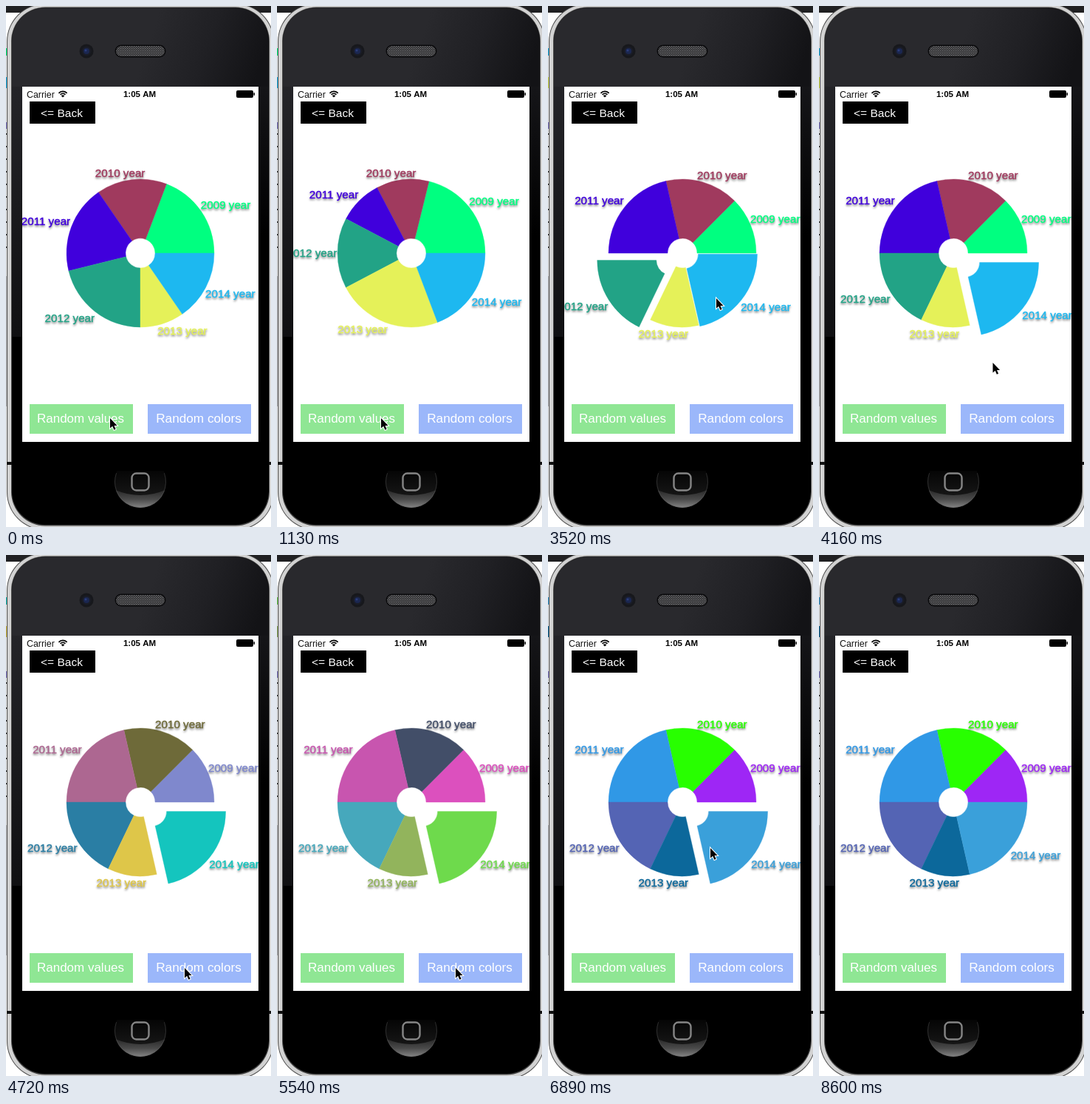
An HTML page with a canvas that plays this animation: 359 px wide and 704 px high, repeating every 8.84 s.

```html
<!DOCTYPE html>
<html lang="en">
<head>
<meta charset="utf-8">
<title>Pie chart demo</title>
<style>
html, body { margin: 0; width: 100%; height: 100%; overflow: hidden; background: #fff; }
canvas { display: block; width: 359px; height: 704px; }
</style>
</head>
<body>
<canvas id="stage"></canvas>
<script>
const W = 359, H = 704, LOOP = 8840, DUR = 520;
const canvas = document.getElementById('stage');
const ctx = canvas.getContext('2d');
const dpr = window.devicePixelRatio || 1;
canvas.width = W * dpr;
canvas.height = H * dpr;

const FONT = '"Liberation Sans", Arial, sans-serif';
const CX = 182, CY = 334, R = 100, HOLE = 20, PULL = 20;
const TAU = Math.PI * 2;

// Slice boundaries in radians, counter-clockwise from the right.
function edgesOf(values) {
  const total = values.reduce((a, b) => a + b);
  let sum = 0;
  return [0, ...values.map(v => -TAU * (sum += v) / total)];
}

const SHARES = [
  { at: 0, v: edgesOf([10, 8, 10, 11, 5, 8]) },
  { at: 610, v: edgesOf([11, 6, 5, 8, 12, 10]) },
  { at: 1620, v: edgesOf([7, 9, 12, 10, 6, 12]) }
];
const COLORS = [
  { at: 0, v: ['00ff80', 'a03a5e', '4000dc', '22a386', 'e5f159', '1db8f0'] },
  { at: 4400, v: ['ce3ffc', '4f8822', 'f0a762', '2f67b7', 'daab3f', '0ecd9f'] },
  { at: 5210, v: ['e45a9a', '3b2d90', 'b126db', '53cdbf', '69b96d', 'a5e11c'] },
  { at: 6030, v: ['9e26f5', '28ff00', '3098e6', '5464b4', '0c689b', '3aa0da'] }
];
for (const c of COLORS) {
  c.v = c.v.map(h => [0, 2, 4].map(i => parseInt(h.substr(i, 2), 16)));
}

// Pointer stops: time, x, y.
const POINTER = [
  [0, 141, 557], [2080, 141, 557], [2410, 127, 382], [2880, 127, 382],
  [3230, 228, 395], [3900, 228, 395], [4400, 242, 558], [6450, 242, 558],
  [6860, 220, 396], [7350, 220, 396], [7850, 252, 641], [8200, 262, 665], [8580, 272, 706]
];

const clamp = x => Math.max(0, Math.min(1, x));
const mix = (a, b, p) => a + (b - a) * p;
const ramp = (t, start) => clamp((t - start) / DUR);
const smooth = p => p * p * (3 - 2 * p);

function stateAt(list, t) {
  let i = list.length - 1;
  while (i > 0 && t < list[i].at) i--;
  if (!i) return list[0].v;
  const p = ramp(t, list[i].at);
  return list[i].v.map((b, k) => {
    const a = list[i - 1].v[k];
    return Array.isArray(b) ? b.map((c, j) => mix(a[j], c, p)) : mix(a, b, p);
  });
}

function pullAt(i, t) {
  if (i === 3) return PULL * (ramp(t, 2660) - ramp(t, 3470));
  if (i === 5) return PULL * (ramp(t, 3470) - ramp(t, 6950));
  return 0;
}

function rect(x, y, w, h, fill) {
  ctx.fillStyle = fill;
  ctx.fillRect(x, y, w, h);
}

function round(x, y, w, h, r, fill) {
  ctx.beginPath();
  ctx.roundRect(x, y, w, h, r);
  ctx.fillStyle = fill;
  ctx.fill();
}

function disc(x, y, r, fill) {
  ctx.beginPath();
  ctx.arc(x, y, r, 0, TAU);
  ctx.fillStyle = fill;
  ctx.fill();
}

function text(s, x, y, size, fill, align = 'center', weight = '') {
  ctx.font = `${weight} ${size}px ${FONT}`;
  ctx.textAlign = align;
  ctx.fillStyle = fill;
  ctx.fillText(s, x, y);
}

function fade(x0, y0, x1, y1, ...stops) {
  const g = ctx.createLinearGradient(x0, y0, x1, y1);
  stops.forEach((c, i) => g.addColorStop(i / (stops.length - 1), c));
  return g;
}

const rgb = c => `rgb(${c.map(Math.round).join(',')})`;

function drawDesk(t, colors) {
  rect(0, 0, W, H, '#fff');
  rect(0, 0, W, 9, '#202022');
  rect(0, 365, 3, 176, '#c4c4c6');
  const early = t < 1900;
  rect(0, 57, 2, 10, rgb(colors[early ? 0 : 5]));
  rect(0, 96, 2, 15, rgb(colors[early ? 5 : 4]));
  rect(0, 157, 2, 9, '#8a80d0');
  for (let y = 172; y < 330; y += 17) rect(0, y, 1.5, 2, '#333');
}

function drawPhone() {
  round(1, -3, 362, 711, 51, '#4a4a4a');
  round(2, -2, 360, 709, 50, '#d2d2d2');
  round(7, 1.5, 350, 701, 46, '#444');
  rect(1, 616, 7, 4, '#111');
  rect(355, 616, 4, 4, '#111');
  ctx.save();
  ctx.beginPath();
  ctx.roundRect(8, 2.5, 348, 698.5, 45);
  ctx.clip();
  rect(0, 0, W, H, '#000');
  rect(0, 0, W, 110, fade(200, 30, 345, 80, '#29292d', '#202024', '#131316'));
  rect(0, 109, 22, 338, fade(0, 109, 0, 447, '#242428', '#101012'));
  rect(342, 109, 17, 200, fade(0, 109, 0, 309, '#151518', '#000'));
  ctx.restore();

  // Camera and speaker
  disc(109, 61, 9.5, '#17181c');
  disc(109, 61, 6.5, '#1a1c26');
  disc(109, 61, 4, '#1b2750');
  disc(108, 60, 1.5, '#2c3d7c');
  round(147.5, 52.5, 69, 17, 8.5, '#08080a');
  ctx.save();
  ctx.beginPath();
  ctx.roundRect(149, 54, 66, 14, 7);
  ctx.clip();
  rect(149, 54, 66, 14, '#2b2b2d');
  for (let y = 54, row = 0; y < 69; y += 1.5, row++) {
    for (let x = 149 + row % 2 * 1.5; x < 216; x += 3) rect(x, y, 1.3, 1.2, '#77777a');
  }
  ctx.restore();

  // Home button
  ctx.save();
  ctx.beginPath();
  ctx.arc(182, 643, 35, 0, TAU);
  ctx.clip();
  rect(147, 628, 70, 52, fade(0, 628, 0, 660, '#050505', '#151515'));
  ctx.beginPath();
  ctx.moveTo(146, 653);
  ctx.quadraticCurveTo(182, 669, 218, 653);
  ctx.lineTo(218, 680);
  ctx.lineTo(146, 680);
  ctx.fillStyle = fade(0, 655, 0, 678, '#2b2b2b', '#4a4a4a', '#858585');
  ctx.fill();
  ctx.restore();
  ctx.beginPath();
  ctx.arc(182, 643, 34.5, -0.35, Math.PI + 0.35);
  ctx.strokeStyle = 'rgba(95,95,95,.55)';
  ctx.lineWidth = 0.8;
  ctx.stroke();
  ctx.beginPath();
  ctx.roundRect(170.5, 631.5, 23, 23, 6);
  ctx.strokeStyle = '#858585';
  ctx.lineWidth = 2.4;
  ctx.stroke();
}

function drawInterface() {
  rect(22, 109, 320, 480, '#fff');
  text('Carrier', 28, 123.5, 12.4, '#111', 'left');
  ctx.strokeStyle = '#000';
  ctx.lineWidth = 1.7;
  for (const r of [4.6, 7.6]) {
    ctx.beginPath();
    ctx.arc(77, 123, r, -Math.PI * 0.76, -Math.PI * 0.24);
    ctx.stroke();
  }
  ctx.beginPath();
  ctx.moveTo(77, 123.5);
  ctx.arc(77, 123.5, 3, -Math.PI * 0.76, -Math.PI * 0.24);
  ctx.fillStyle = '#000';
  ctx.fill();
  text('1:05 AM', 181, 123.3, 11.5, '#000', 'center', 'bold');
  round(312, 114, 23, 10, 2, '#000');
  round(335.5, 117, 1.5, 4, 1, '#000');

  rect(32, 129, 89, 30, '#000');
  text('<= Back', 75.5, 149.5, 15.5, '#fff');
  rect(32, 538, 140, 40, '#8fe694');
  text('Random values', 101, 563, 17, '#fff');
  rect(192, 538, 140, 40, '#9bb7fa');
  text('Random colors', 261, 563, 17.2, '#fff');
}

function drawChart(t, colors) {
  const edges = stateAt(SHARES, t);
  const slices = colors.map((c, i) => {
    const a = edges[i], b = edges[i + 1], mid = (a + b) / 2, pull = pullAt(i, t);
    return { a, b, color: rgb(c), cos: Math.cos(mid), sin: Math.sin(mid),
      x: CX + pull * Math.cos(mid), y: CY + pull * Math.sin(mid) };
  });
  ctx.save();
  ctx.beginPath();
  ctx.rect(22, 109, 320, 480);
  ctx.clip();
  for (const s of slices) {
    ctx.beginPath();
    ctx.arc(s.x, s.y, R, s.a, s.b, true);
    ctx.arc(s.x, s.y, HOLE, s.b, s.a);
    ctx.closePath();
    ctx.fillStyle = ctx.strokeStyle = s.color;
    ctx.lineWidth = 0.4;
    ctx.fill();
    ctx.stroke();
  }
  // Labels sit just outside the rim, pushed away by half their own size.
  ctx.shadowColor = 'rgba(0,0,0,.65)';
  ctx.shadowBlur = 3 * dpr;
  ctx.shadowOffsetY = 2 * dpr;
  ctx.lineWidth = 0.4;
  slices.forEach((s, i) => {
    const label = `${2009 + i} year`;
    const x = s.x + R * s.cos + 34 * Math.tanh(3.85 * s.cos) - 0.6;
    const y = s.y + R * s.sin + 9 * Math.tanh(4 * s.sin) + 5.3;
    ctx.strokeStyle = s.color;
    text(label, x, y, 15.2, s.color);
    ctx.save();
    ctx.shadowColor = 'transparent';
    ctx.strokeText(label, x, y);
    ctx.restore();
  });
  ctx.restore();
}

function drawPointer(t) {
  let i = 0;
  while (i < POINTER.length - 2 && t >= POINTER[i + 1][0]) i++;
  const a = POINTER[i], b = POINTER[i + 1];
  const p = smooth(clamp((t - a[0]) / (b[0] - a[0])));
  ctx.save();
  ctx.translate(mix(a[1], b[1], p), mix(a[2], b[2], p));
  const shape = new Path2D('M0 0V13.5L3.2 10.8L5.4 15.8L7.6 14.8L5.5 10H9.6Z');
  ctx.strokeStyle = '#fff';
  ctx.lineWidth = 2;
  ctx.stroke(shape);
  ctx.fillStyle = '#000';
  ctx.fill(shape);
  ctx.restore();
}

function draw(t) {
  ctx.setTransform(dpr, 0, 0, dpr, 0, 0);
  const colors = stateAt(COLORS, t);
  drawDesk(t, colors);
  drawPhone();
  drawInterface();
  drawChart(t, colors);
  drawPointer(t);
}

const begin = performance.now();
function tick() {
  draw((performance.now() - begin) % LOOP);
  requestAnimationFrame(tick);
}
tick();
</script>
</body>
</html>
```
